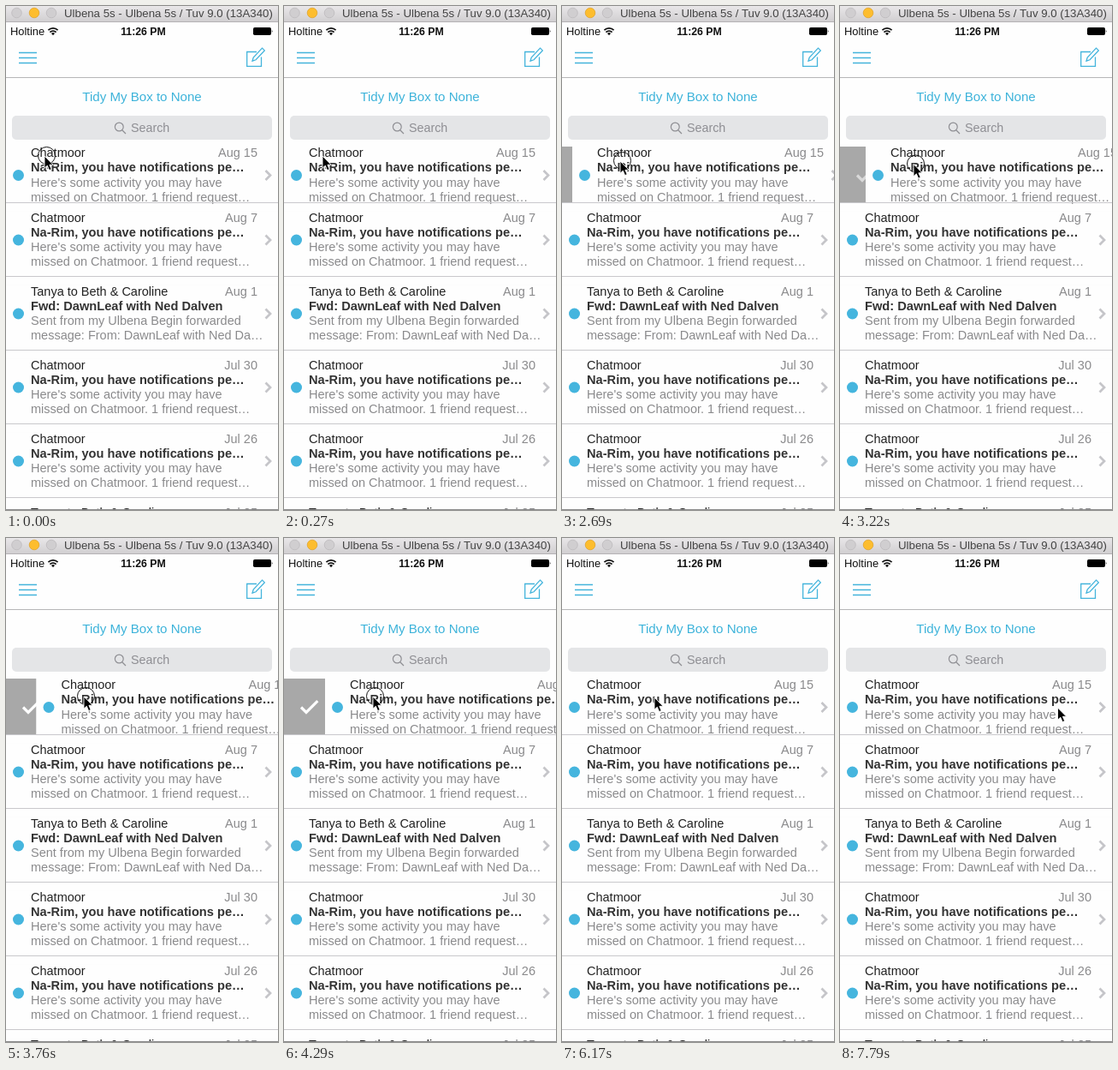
Recreate the animation shown at these times as an HTML page. Size 318 by 588 pixels, loop 8000 ms.

```html
<!DOCTYPE html>
<html lang="en">
<head>
<meta charset="utf-8">
<title>Mail swipe</title>
<style>
  html, body { margin: 0; height: 100%; overflow: hidden; background: #fefefe; }
  svg { display: block; width: 318px; height: 588px; }
  text { font: 14.5px "Liberation Sans", Arial, sans-serif; fill: #8a8a8c; }
  .name { fill: #222; }
  .subject { font-size: 14.65px; font-weight: bold; fill: #333; }
  .date { text-anchor: end; }
  .blue { fill: none; stroke: #43b4dc; stroke-width: 1.3; }
  .chevron { fill: none; stroke: #c5c5c9; stroke-width: 2.7; }
</style>
</head>
<body>
<svg viewBox="0 0 318 588">
  <defs>
    <linearGradient id="bar" x2="0" y2="1">
      <stop stop-color="#e9e7e9"/><stop offset="1" stop-color="#d1cfd1"/>
    </linearGradient>
  </defs>
  <rect width="318" height="588" fill="#fefefe"/>

  <!-- window title -->
  <rect width="318" height="18" fill="url(#bar)"/>
  <path d="M0 18.5H318" stroke="#b4b2b4"/>
  <g fill="#d0ced0" stroke="#b9b7b9" stroke-width=".7">
    <circle cx="12.5" cy="8" r="5.8"/>
    <circle cx="33" cy="8" r="5.8" fill="#fdbd2e" stroke="#dfa023"/>
    <circle cx="53" cy="8" r="5.8"/>
  </g>
  <text x="68" y="13" style="font-size:13.25px;fill:#444">Ulbena 5s - Ulbena 5s / Tuv 9.0 (13A340)</text>

  <!-- status bar -->
  <text x="5" y="34" style="font-size:12.9px;fill:#111">Holtine</text>
  <g fill="none" stroke="#111" stroke-width="1.7">
    <path d="M49.4 28.2a8 8 0 0 1 11.2 0M51.4 30.6a5 5 0 0 1 7.2 0"/>
    <path d="M53 32l2 2.3 2-2.3a3 3 0 0 0-4 0z" fill="#111" stroke="none"/>
  </g>
  <text x="160.5" y="34" text-anchor="middle" style="font-size:12.3px;font-weight:bold;fill:#111">11:26 PM</text>
  <rect x="289" y="25" width="21" height="9" rx="1.8"/>
  <path d="M310.8 27.8q1.6 1.7 0 3.4z"/>

  <!-- navigation -->
  <path class="blue" d="M15 54.5H36M15 60.5H36M15 66.5H36"/>
  <path class="blue" d="M293 53.5H281.7V70.3H298.5V59.5M288 64.2l1.2-4.2 10.3-10.9 2.8 2.8-10.2 10.9z"/>
  <path d="M0 83.5H318" stroke="#b6b6b8"/>
  <text x="159" y="111" text-anchor="middle" style="font-size:15.1px;fill:#3db3da">Tidy My Box to None</text>
  <rect x="7" y="128" width="304" height="28" rx="5" fill="#e4e5e7"/>
  <path d="M136 145l4 4M137.2 141a4.9 4.9 0 1 1-9.8 0a4.9 4.9 0 1 1 9.8 0" fill="none" stroke="#8e8e93" stroke-width="1.2"/>
  <text x="146" y="147" style="font-size:14.3px;fill:#8e8e93">Search</text>

  <!-- mail list -->
  <rect id="tray" y="164" height="65.5" fill="#a8a8a8"/>
  <path id="check" d="M20 197.5L26 203.5L39.3 190.2" fill="none" stroke="#fff" stroke-width="3.2"/>
  <g id="list"></g>
  <path d="M0 587.5H318" stroke="#8c8c8c"/>

  <!-- pointer -->
  <g id="pointer">
    <circle id="press" cx="2.5" cy="-.5" r="10" fill="none" stroke="#111"/>
    <path d="M0 0V14.2L3.3 11.2L5.6 16.6L8.2 15.5L5.9 10.3H10.2Z" stroke="#fff" stroke-width=".9"/>
  </g>
</svg>
<script>
const $ = id => document.getElementById(id);

const notice = ["Chatmoor", "Na-Rim, you have notifications pe…",
  "Here's some activity you may have", "missed on Chatmoor. 1 friend request…"];
const forward = ["Tanya to Beth &amp; Caroline", "Fwd: DawnLeaf with Ned Dalven",
  "Sent from my Ulbena Begin forwarded", "message: From: DawnLeaf with Ned Da…"];

// y is the baseline of the sender's name
const mails = [
  [176, "Aug 15", notice], [251.5, "Aug 7", notice], [337.5, "Aug 1", forward],
  [423.5, "Jul 30", notice], [509.5, "Jul 26", notice], [595.5, "Jul 25", forward]
];

const mailRow = ([y, date, [name, subject, line1, line2]], i) => `
  <g id="mail${i}">
    <rect y="${y - 12}" width="318" height="${i ? 76 : 65.5}" fill="#fefefe"/>
    <circle cx="14.5" cy="${y + 21.5}" r="6.5" fill="#45b5de"/>
    <text class="name" x="29" y="${y}">${name}</text>
    <text class="date" x="294" y="${y}">${date}</text>
    <text class="subject" x="29" y="${y + 17.3}">${subject}</text>
    <text x="29" y="${y + 34.6}">${line1}</text>
    <text x="29" y="${y + 51.5}">${line2}</text>
    <path class="chevron" d="M303.5 ${y + 16}l5.5 5.5l-5.5 5.5"/>
  </g>
  <path d="M0 ${229.5 + 86 * i}H318" stroke="#c9c8cc"/>`;
$("list").innerHTML = mails.map(mailRow).join("");

// start time, row offset, pointer x, pointer y, pressed
const steps = [
  [0, 0, 45, 175, 1], [270, 0, 45, 175, 0], [2150, 0, 45, 175, 1],
  [2690, 12, 68, 181, 1], [2960, 18, 74, 183, 1], [3220, 30, 86, 184.5, 1],
  [3490, 34, 90, 185, 1], [3760, 35.5, 91, 185, 1], [4030, 42, 98, 185, 1],
  [4290, 48, 104, 185, 1], [4560, 52, 108, 185, 1], [4820, 52, 108, 186, 1],
  [6170, 0, 108, 186, 0], [7250, 0, 111, 187, 0], [7520, 0, 224, 188, 0],
  [7790, 0, 254.5, 198, 0]
];

function draw(now) {
  const t = now % 8000;
  const [, offset, x, y, pressed] = steps.findLast(step => step[0] <= t);
  $("mail0").setAttribute("transform", `translate(${offset})`);
  $("tray").setAttribute("width", offset);
  $("check").setAttribute("opacity", Math.min(1, Math.max(0, (offset - 18) / 16)) ** 2);
  $("pointer").setAttribute("transform", `translate(${x} ${y})`);
  $("press").setAttribute("visibility", pressed ? "visible" : "hidden");
}

const start = performance.now();
function tick() {
  draw(performance.now() - start);
  requestAnimationFrame(tick);
}
tick();
</script>
</body>
</html>
```
